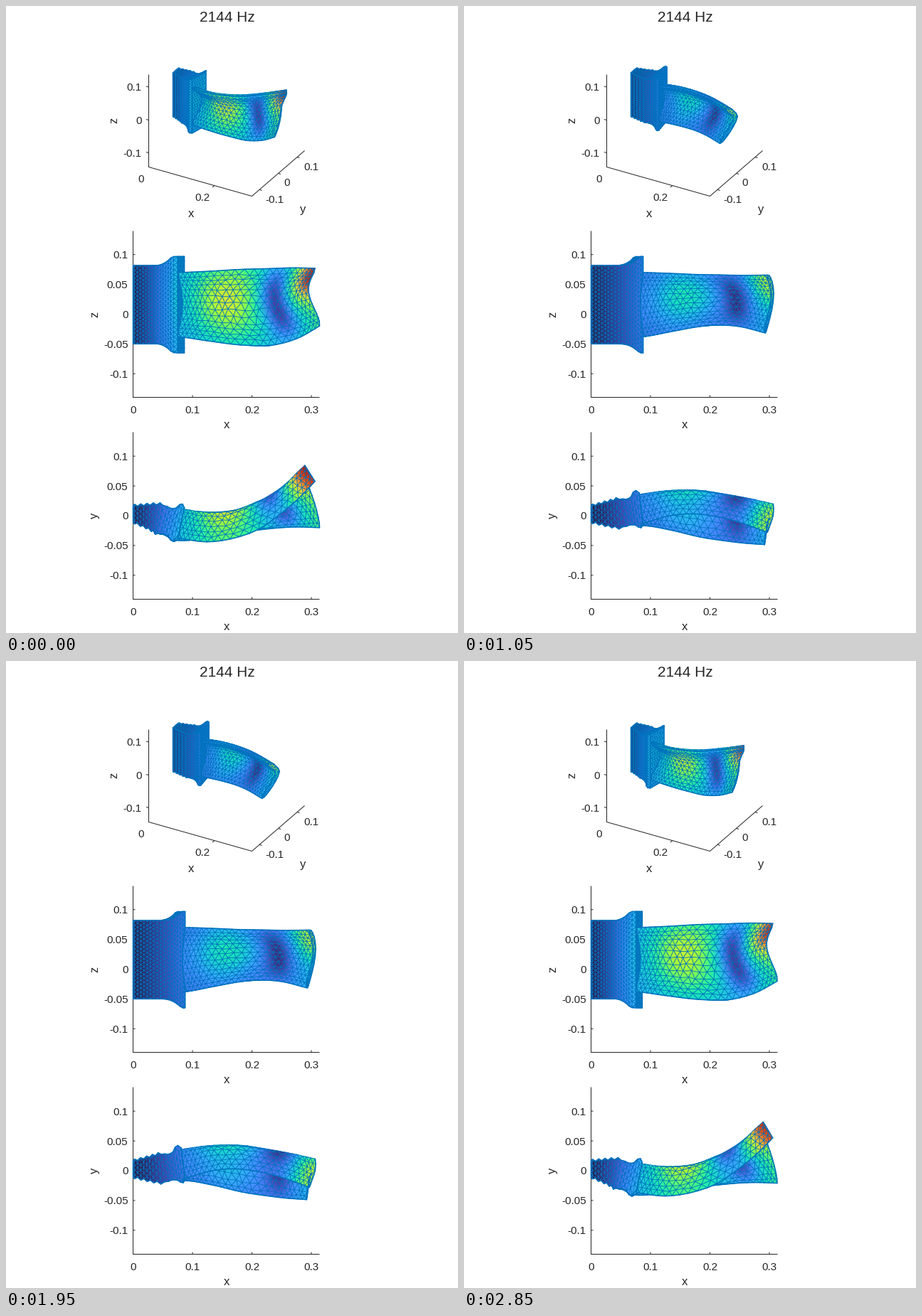
Animation of 635x882 px, one loop 3 s. Source, as a matplotlib script:

```python
import numpy as np
import matplotlib.pyplot as plt
from matplotlib.animation import FuncAnimation
from matplotlib.collections import LineCollection, TriMesh
from matplotlib.tri import Triangulation

W, H, DPI = 635, 882, 100
PX = 72 / DPI
FRAMES, INTERVAL = 20, 150
SCALE = 835
INK = (0.15, 0.15, 0.15)
EDGE = (0, 0.447, 0.741)
X0, X1 = 0.083, 0.3          # blade foot and tip

plt.rcParams["font.family"] = "Liberation Sans"
rng = np.random.default_rng(4)

fig = plt.figure(figsize=(W / DPI, H / DPI), dpi=DPI, facecolor="white")
ax = fig.add_axes([0, 0, 1, 1])
ax.set_xlim(-0.5, W - 0.5)
ax.set_ylim(H - 0.5, -0.5)
ax.axis("off")


# ---- axes and labels -------------------------------------------------
def line(*pts):
    ax.plot(*zip(*pts), color=INK, lw=PX, solid_capstyle="butt", snap=False, zorder=1)


def label(x, y, s, ha="center", size=11, drop=5.5):
    ax.text(x, y + drop, s, ha=ha, va="baseline", fontsize=size, color=INK)


def side_label(x, y, s):
    ax.text(x, y, s, ha="center", va="center", rotation=90, fontsize=12, color=INK)


def flat_axes(top, mid, bottom, name):
    line((178, top), (178, bottom), (440, bottom))
    for v in (0.1, 0.05, 0, -0.05, -0.1):
        y = mid - 838 * v
        line((178, y), (181, y))
        label(171, y, f"{v:g}", "right")
    for v in (0, 0.1, 0.2, 0.3):
        x = 178 + SCALE * v
        line((x, bottom), (x, bottom - 3))
        label(x, bottom + 17, f"{v:g}")
    label(310, bottom + 39, "x", size=12, drop=4.5)
    side_label(124, mid, name)


def solid_axes():
    line((200, 96), (200, 226), (345, 267), (419, 203))
    for v, y in ((0.1, 113.5), (0, 160), (-0.1, 206)):
        line((200, y), (196.5, y - 1))
        label(190, y - 0.5, f"{v:g}", "right")
    line((292.4, 252), (289.5, 254.5))
    label(189, 242, "0")
    label(275, 268.5, "0.2")
    for v, x, y in ((-0.1, 377, 271), (0, 394, 247), (0.1, 428, 225)):
        tx, ty = 382 + 264 * v, 235 - 229 * v
        line((tx, ty), (tx + 3.5, ty + 1))
        label(x, y, f"{v:g}")
    label(260, 292, "x", size=12, drop=4.5)
    label(417, 287, "y", size=12, drop=3)
    side_label(151, 160, "z")


label(310, 14, "2144 Hz", size=15, drop=7)
solid_axes()
flat_axes(316, 433, 550, "z")
flat_axes(599, 716.5, 834, "y")


# ---- geometry --------------------------------------------------------
def sheet(shape, us, vs, jitter=0.0):
    """Staggered triangle mesh; the normal points along dP/dv x dP/du."""
    n, m = len(us), len(vs)
    U, V = np.meshgrid(us, vs, indexing="ij")
    du, dv = np.gradient(us), np.gradient(vs)
    V[::2, 1:-1] -= 0.25 * dv[1:-1]
    V[1::2, 1:-1] += 0.25 * dv[1:-1]
    size = (n - 2, m - 2)
    U[1:-1, 1:-1] += jitter * rng.uniform(-1, 1, size) * du[1:-1, None]
    V[1:-1, 1:-1] += jitter * rng.uniform(-1, 1, size) * dv[1:-1]
    tris = []
    for i in range(n - 1):
        for j in range(m - 1):
            a, b = i * m + j, i * m + j + 1
            c, d = a + m, b + m
            tris += [(a, d, c), (a, b, d)] if i % 2 else [(a, b, c), (b, d, c)]
    rim = np.zeros((n, m), bool)
    rim[[0, -1]] = True
    rim[:, [0, -1]] = True
    pts = np.array([np.broadcast_to(p, U.shape).ravel() for p in shape(U, V)])
    return pts, np.array(tris), rim.ravel()


PITCH = 0.0102               # spacing of the root teeth
BODY_X = [0, 0.047, 0.06, 0.068, 0.075, 0.08, X0]


def teeth(x):
    return 0.0018 * np.sin(2 * np.pi * x / PITCH) * (x < 0.051)


def body_back(x):
    return np.interp(x, BODY_X, [.017, .026, .022, .023, .034, .034, .029]) + teeth(x)


def body_front(x):
    return np.interp(x, BODY_X, [-.011, -.025, -.021, -.022, -.028, -.029, -.025]) - teeth(x)


def flare(x):
    return 0.015 * np.clip((x - 0.045) / 0.031, 0, 1) ** 2.2


def body_side(x, t):
    return x, body_front(x), 0.082 + flare(x) - t * (0.132 + 2 * flare(x))


def body_top(x, t):
    return x, body_back(x) + t * (body_front(x) - body_back(x)), 0.082 + flare(x)


def body_end(t, s):
    return X0, 0.029 - 0.054 * s, 0.097 - 0.162 * t


def blade_low(x):
    return -0.038 + 0.011 * np.clip((x - X0) / (X1 - X0), 0, 1)


def blade(x, u, side):
    """side runs from 1 (convex, +y) to -1 (concave, -y)."""
    f = (x - X0) / (X1 - X0)
    lead, trail = -0.022 + 0.026 * f, -0.026 - 0.012 * f
    y = lead + (trail - lead) * u + 0.176 * u * (1 - u)
    dy = trail - lead + 0.176 * (1 - 2 * u)
    dz = blade_low(x) - 0.070
    thick = side * 0.007 * np.sqrt(np.clip(1 - (2 * u - 1) ** 6, 0, 1)) / np.hypot(dy, dz)
    return x, y - thick * dz, 0.070 + u * dz + thick * dy


def crowd(n, k):
    t = np.linspace(0, 1, n)
    return t - k * np.sin(2 * np.pi * t)


us = crowd(14, 0.08)
xs = X0 + (X1 - X0) * crowd(23, 0.06)
body_xs = np.r_[0, np.arange(PITCH / 4, 0.05, PITCH / 2), np.linspace(0.055, X0, 7)]
SHEETS = [
    sheet(body_top, body_xs, np.linspace(0, 1, 5)),
    sheet(body_side, body_xs, np.linspace(0, 1, 21)),
    sheet(body_end, np.linspace(0, 1, 21), np.linspace(0, 1, 8)),
    sheet(lambda u, x: blade(x, u, -1), us, xs[::-1], 0.16),
    sheet(lambda u, x: blade(x, u, 1), us, xs, 0.16),
    sheet(lambda u, s: blade(X1, u, s), us, np.linspace(1, -1, 3)),
]


# ---- vibration mode --------------------------------------------------
KNOTS = np.array([0, 0.04, 0.083, 0.13, 0.18, 0.22, 0.26, 0.3])
LEAD = [0, -4, -13, -23, -19, -5, 17, 45]
MID = [0, -4, -13, -19, -17, -6, 6, 21]
TRAIL = [0, -4, -13, -7, 4, 10, 14, 15]
LEAD_Z = [0, 0, 0, 2, 5, 6, 7, 6]
TRAIL_Z = [0, 0, 0, -8, -16, -18, -11, 6]


def curve(x, ys):
    """Cubic Hermite curve through the knots."""
    ys = np.array(ys, float)
    slope = np.gradient(ys, KNOTS)
    i = np.clip(np.searchsorted(KNOTS, x) - 1, 0, len(KNOTS) - 2)
    h = KNOTS[i + 1] - KNOTS[i]
    t = (x - KNOTS[i]) / h
    s = t * t * (3 - 2 * t)
    return (ys[i] * (1 - s) + ys[i + 1] * s
            + h * t * (1 - t) * ((1 - t) * slope[i] - t * slope[i + 1]))


def mode(x, y, z):
    u = np.clip((0.072 - z) / (0.072 - blade_low(x)), 0, 1)
    a = np.interp(u, [0.18, 0.52], [1, 0])
    a = a * a * (3 - 2 * a)
    c = np.interp(u, [0.52, 1], [0, 1])
    dy = a * curve(x, LEAD) + (1 - a - c) * curve(x, MID) + c * curve(x, TRAIL)
    e = 1e-4
    tilt = (curve(x + e, MID) - curve(x - e, MID)) / (2 * e)
    twist = np.clip((x - X0) / 0.2, 0, 1) * (0.5 - 0.9 * u)
    dx = -tilt * (1 + twist) * (y - 0.013) * np.clip(x / 0.06, 0, 1)
    dz = (1 - u) * curve(x, LEAD_Z) + u * curve(x, TRAIL_Z)
    return np.array([dx, dy, dz]) / SCALE


def magnitude(x, z):
    """Relative size of the displacement, as shown by the colours."""
    s = 0.25 * np.clip(x / X0, 0, 1) ** 1.4 + 0.16 * np.clip((x - 0.25) / 0.05, 0, 1)
    s = s + 0.33 * np.exp(-((x - 0.157) / 0.053) ** 2 - ((z - 0.028) / 0.052) ** 2)
    node = 0.245 - 0.2 * (z - 0.01)
    fade = np.exp(-((z - 0.022) / 0.042) ** 4)
    s = s * (1 - 0.82 * fade * np.exp(-((x - node) / 0.021) ** 2))
    reach = np.where(z > 0.056, 0.04, 0.034)
    return s + 0.53 * np.exp(-((X1 - x) / 0.03) ** 2 - ((z - 0.056) / reach) ** 2)


MODES = [(mode(*p), magnitude(p[0], p[2])) for p, _, _ in SHEETS]

VIEWS = [
    lambda x, y, z: (200 + 462 * x + 264 * (y + 0.14),
                     226 + 131 * x - 229 * (y + 0.14) - 464 * (z + 0.14)),
    lambda x, y, z: (178 + SCALE * x, 433 - 836 * z),
    lambda x, y, z: (178 + SCALE * x, 716.5 - 836 * y),
]


# ---- drawing ---------------------------------------------------------
shown = []


def add(artist, z):
    artist.set_zorder(z)
    ax.add_collection(artist, autolim=False)
    shown.append(artist)


def draw_sheet(px, py, tris, rim, value, z):
    a, b, c = tris.T
    area = (px[b] - px[a]) * (py[c] - py[a]) - (px[c] - px[a]) * (py[b] - py[a])
    tris = tris[area < 0]        # keep faces turned to the viewer
    if not len(tris):
        return
    skin = TriMesh(Triangulation(px, py, tris), cmap="turbo", norm=plt.Normalize(0, 1))
    skin.set_array(value)
    add(skin, z)
    edges = np.vstack([tris[:, [0, 1]], tris[:, [1, 2]], tris[:, [2, 0]]])
    edges = np.unique(np.sort(edges, axis=1), axis=0)
    width = np.where(rim[edges].all(axis=1), 1.6, 0.9) * PX
    segs = np.stack([px[edges], py[edges]], axis=-1)
    add(LineCollection(segs, colors=[EDGE], linewidths=width,
                       capstyle="round", snap=False), z + 0.5)


def draw(k):
    while shown:
        shown.pop().remove()
    amp = np.cos(2 * np.pi * k / FRAMES)
    for view in VIEWS:
        for i, (pts, tris, rim) in enumerate(SHEETS):
            move, size = MODES[i]
            px, py = view(*(pts + amp * move))
            draw_sheet(px, py, tris, rim, abs(amp) * size, 3 + i)
    return shown


anim = FuncAnimation(fig, draw, frames=FRAMES, interval=INTERVAL,
                     init_func=lambda: [], repeat=True, repeat_delay=0, blit=False)
plt.show()
```
